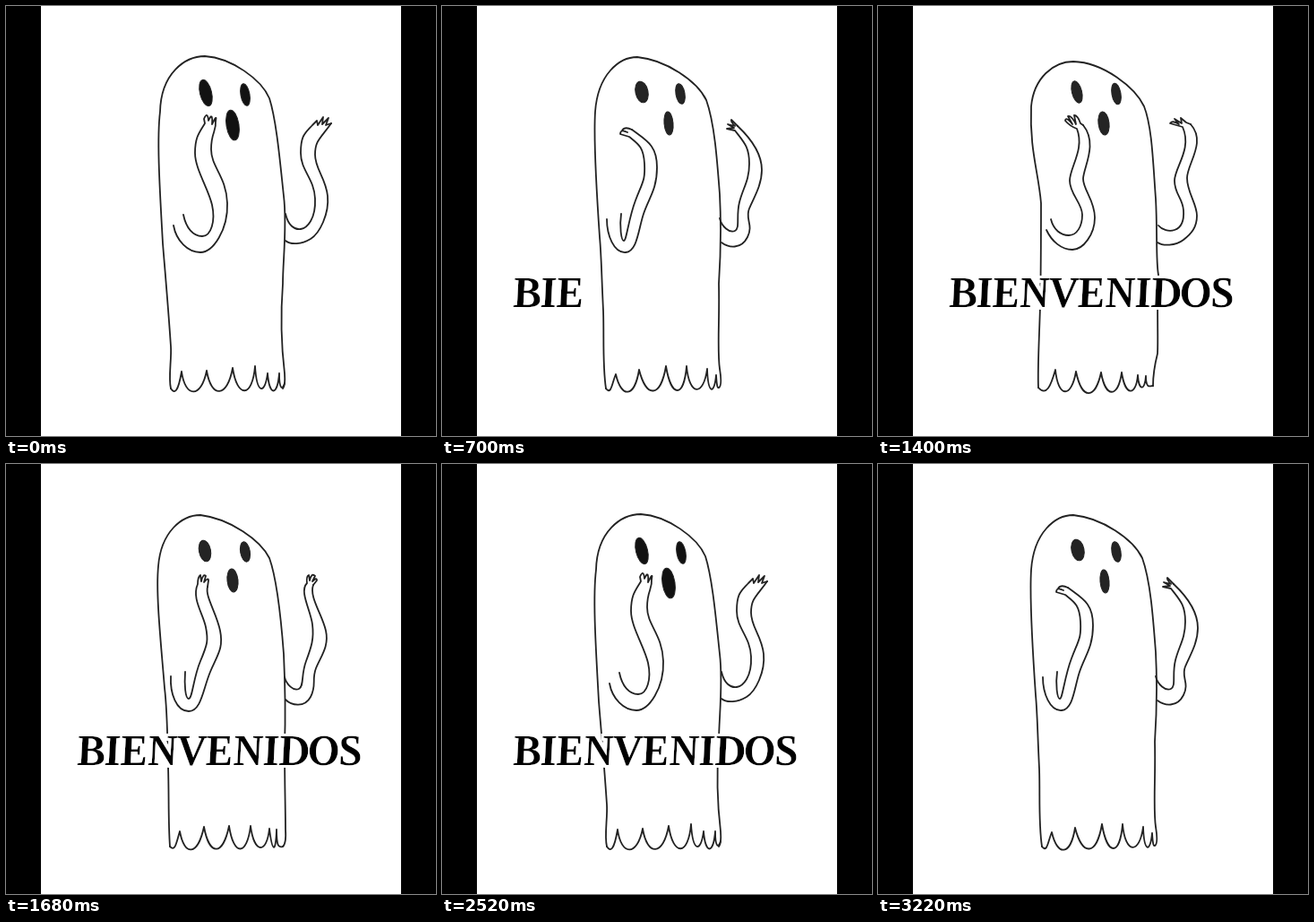
Recreate the animation shown at these times as an HTML page without scripts. Size 480 by 480 pixels, loop 3290 ms.

```html
<!DOCTYPE html>
<html lang="es">
<head>
<meta charset="utf-8">
<title>Bienvenidos</title>
<style>
html, body { margin: 0; width: 100%; height: 100%; overflow: hidden; background: #000; }
svg { display: block; width: 100vw; height: 100vh; }
.ghost { fill: none; stroke: #222; stroke-width: 1.8; stroke-linejoin: round; stroke-linecap: round; }
.ghost ellipse { fill: #242424; stroke-width: 1; }
.ghost .dark ellipse { fill: #121212; }
.word {
  font: italic bold 49px "Liberation Serif", "Times New Roman", serif;
  letter-spacing: -1.8px;
  animation: show 3.29s step-end infinite;
}
.word tspan {
  visibility: hidden;
  animation: type 3.29s step-end calc(var(--t) * 70ms) infinite;
}
@keyframes type { 0% { visibility: visible; } 66% { visibility: hidden; } }
@keyframes show { 0% { opacity: 0; } 17% { opacity: 1; } 82.97% { opacity: 0; } }
</style>
</head>
<body>
<svg viewBox="0 0 480 480">
<defs>
  <filter id="halo" x="-5%" y="-20%" width="110%" height="140%">
    <feMorphology in="SourceAlpha" operator="dilate" radius="2.5" result="fat"/>
    <feFlood flood-color="#fff"/>
    <feComposite in2="fat" operator="in"/>
    <feMerge><feMergeNode/><feMergeNode in="SourceGraphic"/></feMerge>
  </filter>
  <clipPath id="page"><rect x="39" width="402" height="480"/></clipPath>
</defs>
<rect x="39" width="402" height="480" fill="#fff"/>

<!-- six poses side by side, shown one at a time -->
<g clip-path="url(#page)">
<g class="ghost">
  <animateTransform attributeName="transform" type="translate" dur="3.29s" calcMode="discrete" repeatCount="indefinite"
    values="0;-480;-960;-1440;-1920;-2400;
      -2400;0;-480;-960;-1440;-1920;
      -1920;-2400;0;-480;-960;-1440;
      -1440;-1920;-2400;0;-480;-960;
      -960;-1440;-1920;-2400;0;-480;
      -480;-960;-1440;-1920;-2400;0;
      0;-480;-960;-1440;-1920;-2400;
      -2400;0;-480;-960;-1440"/>

  <g class="dark">
    <path d="M184 427C181 415 185 395 184 380C181 335 177 290 175 265C172 210 168 150 172 118C173 75 200 56 222 56C252 58 285 82 294 103C302 128 306 175 310 212C314 245 309 285 309 310C306 350 308 385 311 410Q312 424 309 427"/>
    <path d="M184 427C188 433 192 432 196 408C200 438 218 438 224 407C229 438 247 438 253 404C258 438 275 438 278 402C280 434 289 434 292 410C294 436 303 436 305 410C305 430 309 428 311 421"/>
    <path d="M187 245C190 262 203 275 217 275S248 250 247 220S229 180 229 160S235 141 234 128"/>
    <path d="M198 233C201 248 209 257 219 257S234 240 230 222S211 182 211 164S216 141 222 131L221 126Q225 117 226 128Q231 117 230 132Q236 120 234 128"/>
    <path d="M312 262C318 267 330 266 340 260S361 232 359 212S345 182 345 166S351 148 363 131"/>
    <path d="M312 232C315 245 322 250 329 249S346 238 345 215S329 184 329 164S334 142 342 133L347 128L348 133L354 124L353 132L360 125L357 133L363 131"/>
    <ellipse rx="6.5" ry="15" transform="translate(223 97) rotate(-14)"/>
    <ellipse rx="5" ry="12.5" transform="translate(267 99) rotate(-10)"/>
    <ellipse rx="7" ry="17" transform="translate(253 133) rotate(-9)"/>
  </g>

  <g transform="translate(480)">
    <path d="M183 427C182 400 184 370 182 335C181 290 183 270 178 245C173 200 165 140 169 112C172 76 195 59 215 59C250 62 282 86 292 105C303 130 307 175 310 215C312 260 313 290 313 320C312 360 315 390 314 410Q314 424 309 427"/>
    <path d="M183 427C189 432 190 425 194 410C198 438 213 438 222 405C228 438 240 438 248 406C253 438 268 438 274 407C278 434 291 436 293 409C297 430 299 440 298 404C298 430 302 430 309 427"/>
    <path d="M184 235C182 256 188 277 203 275S222 252 230 233S247 207 238 192S211 147 233 139"/>
    <path d="M199 233C199 246 200 263 205 263S211 240 217 224S224 198 218 186S190 146 222 127Q232 122 238 126L228 130Q236 127 238 131L229 134L237 134L233 139"/>
    <path d="M312 262C316 268 332 274 339 263S344 244 350 231S365 208 357 190S326 147 355 137"/>
    <path d="M312 238C314 245 321 254 326 251S329 238 337 222S344 194 338 183S314 133 346 127Q357 126 359 128L348 131L360 131L349 134L360 136Q358 138 355 137"/>
    <ellipse rx="6" ry="11.3" transform="translate(222 97) rotate(-12)"/>
    <ellipse rx="5.5" ry="11" transform="translate(267 97) rotate(-10)"/>
    <ellipse rx="6.3" ry="13" transform="translate(252.5 129) rotate(-8)"/>
  </g>

  <g transform="translate(960)">
    <path d="M183 427C181 400 182 370 181 338C180 295 180 275 177 250C173 200 167 145 170 114C173 76 196 57 217 57C250 61 284 85 294 105C303 130 307 172 310 212C312 255 312 285 311 315C311 355 312 388 312 408Q313 424 309 427"/>
    <path d="M183 427C189 433 190 423 194 410C199 438 214 438 221 405C227 438 242 438 249 404C254 438 269 438 273 404C277 435 291 436 294 407C297 432 301 437 302 408C302 429 305 428 309 427"/>
    <path d="M184 237C183 256 190 276 204 276S220 251 228 232S243 206 239 186S222 148 225 137"/>
    <path d="M200 232C199 246 200 262 204 262S209 239 217 220S226 197 223 182S207 150 214 134Q214 126 217 124L218 131Q220 122 223 125L221 132Q226 126 226 130L225 137"/>
    <path d="M312 263C318 269 333 273 340 260S341 241 346 228S361 204 357 186S338 148 343 135"/>
    <path d="M311 238C313 246 321 254 327 251S329 236 335 220S344 195 342 179S327 142 336 133Q335 125 338 124L339 130Q341 121 345 125L342 131Q347 126 347 130L343 135"/>
    <ellipse rx="6.5" ry="12" transform="translate(222 97) rotate(-11)"/>
    <ellipse rx="5.3" ry="11.3" transform="translate(267 98) rotate(-10)"/>
    <ellipse rx="6" ry="13" transform="translate(253 130) rotate(-6)"/>
  </g>

  <g transform="translate(1440)">
    <path d="M183 427C179 400 181 370 180 340C178 300 178 280 176 258C172 200 169 150 171 118C174 76 198 57 218 57C250 60 285 84 295 105C304 130 307 170 310 210C312 250 311 280 309 310C310 350 307 385 310 405Q313 424 309 426"/>
    <path d="M183 427C189 435 190 420 194 411C200 438 215 438 220 406C228 438 244 438 250 402C256 438 270 438 273 402C276 436 292 436 296 405C297 434 304 434 306 412C307 428 308 426 309 426"/>
    <path d="M184 238C184 256 192 276 205 275S219 250 225 232S240 205 240 180S228 150 212 138"/>
    <path d="M200 232C198 246 200 262 203 262S208 238 216 217S227 195 226 176S219 154 209 146L199 143Q199 137 207 141L201 139Q204 134 212 138"/>
    <path d="M312 264C320 270 334 272 341 258S338 238 343 226S357 200 357 183S347 150 330 134"/>
    <path d="M310 237C312 246 321 254 327 251S328 235 332 219S343 195 343 176S337 152 327 139L318 137L326 136L319 132L327 134Q322 129 323 127L330 134"/>
    <ellipse rx="7" ry="12" transform="translate(223 96) rotate(-12)"/>
    <ellipse rx="5" ry="11.5" transform="translate(266 98) rotate(-10)"/>
    <ellipse rx="5" ry="13" transform="translate(253 131) rotate(-5)"/>
  </g>

  <g transform="translate(1920)">
    <path d="M181 427C179 402 181 370 181 338C180 295 180 270 178 240C175 192 169 155 171 118C174 78 197 59 218 59C251 62 286 88 296 108C305 132 307 172 310 212C312 250 311 282 311 305C310 345 310 378 311 398Q311 418 308 425"/>
    <path d="M181 427C188 435 191 422 196 408C200 438 215 438 220 407C228 440 243 438 250 405C255 438 269 438 272 405C276 436 290 436 293 408C294 432 301 432 302 412C303 428 306 425 308 425"/>
    <path d="M186 244C189 260 198 274 211 274S231 253 234 234S234 205 235 187S237 152 220 135"/>
    <path d="M196 235C197 248 202 259 208 259S218 242 222 225S221 203 220 186S225 157 215 141L204 136Q206 130 212 137L206 131Q211 127 215 135L212 129Q218 128 220 135"/>
    <path d="M312 264C319 269 333 270 341 260S347 242 349 230S351 204 351 188S357 151 339 133"/>
    <path d="M311 241C315 248 323 253 329 250S335 238 337 224S337 202 337 186S344 156 333 137L322 133Q325 128 331 133L325 128Q330 125 334 132L333 128Q337 128 339 133"/>
    <ellipse rx="6.3" ry="12.5" transform="translate(222 96) rotate(-12)"/>
    <ellipse rx="5" ry="11.7" transform="translate(266 98) rotate(-10)"/>
    <ellipse rx="5.5" ry="13" transform="translate(252 131) rotate(-6)"/>
  </g>

  <g transform="translate(2400)">
    <path d="M179 426C178 405 180 370 181 335C182 290 182 260 182 220C179 185 169 160 171 112C174 80 196 62 218 62C252 63 287 91 297 112C306 135 307 175 310 215C312 250 310 285 313 300C311 340 313 370 312 388Q307 408 307 424"/>
    <path d="M179 426C188 436 193 424 198 406C201 438 216 438 221 408C228 442 243 438 249 409C254 438 268 438 272 409C276 436 288 436 290 412C291 430 298 430 299 413C299 428 304 424 307 424"/>
    <path d="M188 250C194 263 205 272 217 272S242 255 242 236S229 205 229 193S246 154 229 133"/>
    <path d="M193 238C196 250 204 256 213 256S228 246 228 233S214 210 214 195S231 160 222 137Q214 134 209 128Q210 123 217 132L212 123Q216 122 221 132L219 122Q223 122 226 131L229 133"/>
    <path d="M312 264C318 268 332 268 341 261S356 247 356 234S345 208 345 192S367 152 349 132"/>
    <path d="M313 245C317 250 325 252 331 250S342 242 341 228S331 210 331 195S351 160 340 135L326 131Q329 127 336 132L331 126L339 131L338 125L344 130L349 132"/>
    <ellipse rx="5.5" ry="12.5" transform="translate(222 96) rotate(-14)"/>
    <ellipse rx="5" ry="12" transform="translate(266 98) rotate(-10)"/>
    <ellipse rx="6" ry="13" transform="translate(252 131) rotate(-7)"/>
  </g>
</g>
</g>

<g class="word" filter="url(#halo)">
  <text transform="translate(80 336) skewX(7)"><tspan style="--t:8">B</tspan><tspan style="--t:9">I</tspan><tspan style="--t:10">E</tspan><tspan style="--t:11">N</tspan><tspan style="--t:13">V</tspan><tspan style="--t:14">E</tspan><tspan style="--t:15">N</tspan><tspan style="--t:16">I</tspan><tspan style="--t:17">D</tspan><tspan style="--t:19">O</tspan><tspan style="--t:20">S</tspan></text>
</g>
</svg>
</body>
</html>
```
